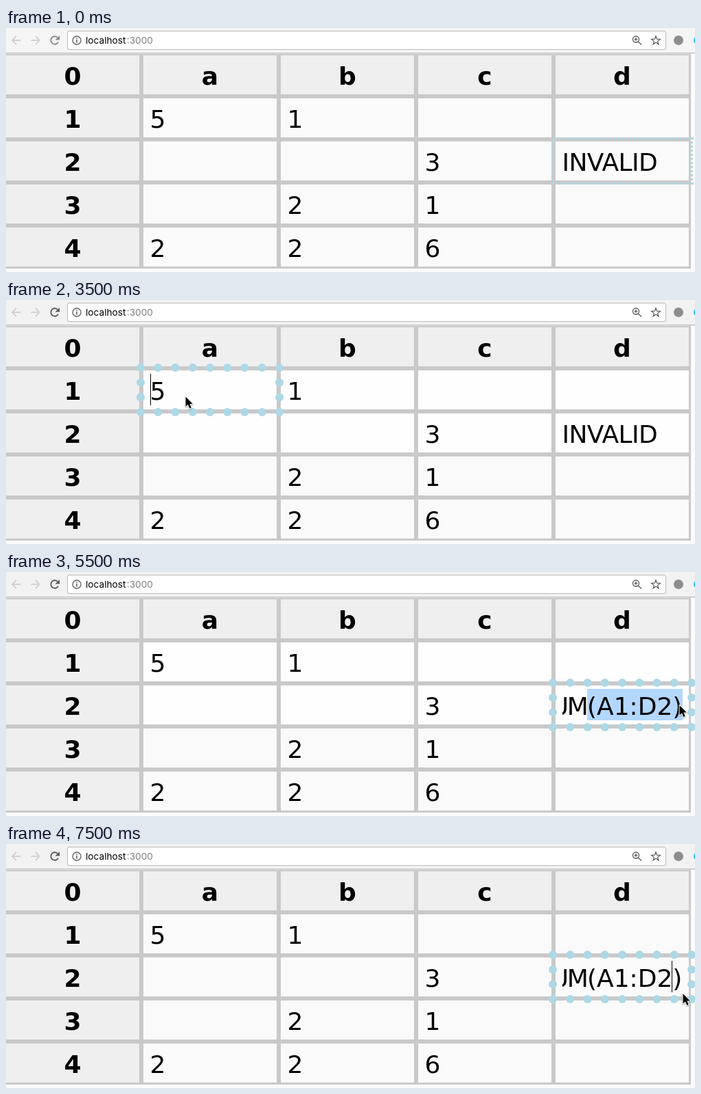
Animation of 1003 by 357 pixels, one loop 8 s. Source, as an HTML page with a canvas:

```html
<!DOCTYPE html>
<html lang="en">
<head>
<meta charset="utf-8">
<title>Spreadsheet</title>
<style>
  html, body { margin: 0; width: 100%; height: 100%; overflow: hidden; background: #fbfbfb; }
  canvas { display: block; }
</style>
</head>
<body>
<canvas id="stage" width="1003" height="357"></canvas>
<script>
const ctx = document.getElementById('stage').getContext('2d');
const LOOP = 8000, COL = 200, ROW = 63;
const BLUE = '#add8e6', SELECT = '#b3d7ff', LINE = '#c9c9c9';
const FONT = '"DejaVu Sans", sans-serif';
const rows = [
  ['0', 'a', 'b', 'c', 'd'],
  ['1', '5', '1', '', ''],
  ['2', '', '', '3', 'INVALID'],
  ['3', '', '2', '1', ''],
  ['4', '2', '2', '6', '']
];

// Pointer stops: time, x, y; a stop without a place hides it.
const pointerStops = [
  [0], [1250, 257, 68], [1500, 257, 148], [1750, 259, 146], [2000, 261.5, 141.5],
  [3750, 467, 120], [4000, 878, 191], [4250, 880.5, 213.5], [4500],
  [4750, 877.5, 198.5], [5000, 877.5, 195], [5250, 923, 195], [5500, 980.5, 195],
  [5750, 990, 195], [6000, 952, 196], [6250], [6500, 985.5, 219]
];

const between = (t, from, to) => t >= from && t < to;

function box(x, y, w, h, color) {
  ctx.fillStyle = color;
  ctx.fillRect(x, y, w, h);
}

function disc(x, y, r, color) {
  ctx.fillStyle = color;
  ctx.beginPath();
  ctx.arc(x, y, r, 0, 2 * Math.PI);
  ctx.fill();
}

function stroke(color, width, path) {
  ctx.strokeStyle = color;
  ctx.lineWidth = width;
  ctx.beginPath();
  path();
  ctx.stroke();
}

function polyline(points) {
  points.forEach(([x, y], i) => i ? ctx.lineTo(x, y) : ctx.moveTo(x, y));
}

function label(text, x, y, font, { color = '#000', align = 'left', tracking = 0 } = {}) {
  ctx.font = font;
  ctx.fillStyle = color;
  ctx.textAlign = align;
  ctx.letterSpacing = tracking + 'px';
  ctx.fillText(text, x, y);
  ctx.letterSpacing = '0px';
}

function drawArrow(x, dir) {
  stroke('#d2d2d2', 1.8, () => {
    polyline([[x - 6.5 * dir, 18], [x + 6 * dir, 18]]);
    polyline([[x, 12], [x + 6 * dir, 18], [x, 24]]);
  });
}

function drawToolbar(active) {
  const ink = active ? '#5c5c5c' : '#8c8c8c';
  box(0, 0, 1003, 36, active ? '#f2f2f2' : '#f5f5f5');
  box(0, 36, 1003, 1, '#bdbdbd');
  box(0, 37, 1003, 1, '#e4e4e4');

  drawArrow(15, -1);
  drawArrow(43, 1);
  stroke(ink, 1.9, () => ctx.arc(71, 18, 5.7, 0.5, 5.5));
  ctx.fillStyle = ink;
  ctx.beginPath();
  polyline([[78, 11], [78, 17.5], [71.5, 17.5]]);
  ctx.fill();

  ctx.fillStyle = '#fff';
  ctx.beginPath();
  ctx.roundRect(89.5, 4.5, 871, 27, 2.5);
  ctx.fill();
  ctx.strokeStyle = '#b8b8b8';
  ctx.lineWidth = 1;
  ctx.stroke();

  stroke('#5c5c5c', 1.3, () => ctx.arc(103, 18, 6, 0, 2 * Math.PI));
  box(102.2, 17, 1.6, 4.5, '#5c5c5c');
  box(102.2, 14.3, 1.6, 1.6, '#5c5c5c');
  const urlFont = '13.7px Inter, sans-serif';
  label('localhost', 116, 23, urlFont);
  label(':3000', 214, 23, urlFont, { color: '#7c7c7c', align: 'right' });

  stroke('#5c5c5c', 1.4, () => {
    ctx.arc(917, 16.5, 4.5, 0, 2 * Math.PI);
    polyline([[920.3, 19.8], [925, 24.5]]);
    polyline([[914.8, 16.5], [919.2, 16.5]]);
    polyline([[917, 14.3], [917, 18.7]]);
  });
  stroke('#5c5c5c', 1.3, () => {
    polyline(Array.from({ length: 10 }, (_, i) => {
      const a = i * Math.PI / 5 - Math.PI / 2, r = i % 2 ? 2.8 : 6.6;
      return [946 + r * Math.cos(a), 18.5 + r * Math.sin(a)];
    }));
    ctx.closePath();
  });
  disc(979, 18, 7, '#8e8e8e');
  disc(1008, 18, 7, '#35c3ee');
}

function cellColor(r, c, t) {
  if (!r || !c) return '#efefef';
  if (r === 1 && between(t, 2000, 2500)) return c === 1 ? '#fcfcfc' : '#f7f7f7';
  return r < 3 && between(t, 2500, 7500) ? '#fefefe' : '#fafafa';
}

function drawFormula(t) {
  const scroll = t >= 5500 ? 60 : 0;
  if (between(t, 5250, 5500)) box(906, 171, 14, 46, SELECT);
  if (between(t, 5500, 6500)) box(846, 171, t < 6000 ? 139 : 123, 46, SELECT);
  ctx.save();
  ctx.beginPath();
  ctx.rect(810, 168, 176, 54);
  ctx.clip();
  label('=', 809 - scroll, 207, `28px ${FONT}`);
  label('SUM', 832 - scroll, 209, `36px ${FONT}`, { tracking: -2.2 });
  label('(A1:D2)', 906 - scroll, 209, `36px ${FONT}`);
  ctx.restore();
}

function drawGrid(t) {
  box(0, 38, 997, 314, LINE);
  rows.forEach((row, r) => row.forEach((text, c) => {
    const x = c ? c * COL : 0, y = 40 + r * ROW, head = !r || !c;
    const baseline = 83 + r * ROW;
    box(x, y, c ? 194 : 194, 57, cellColor(r, c, t));
    if (r === 1 && text && between(t, 2250, 2500))
      box(c ? x + 10 : 85, 108, c ? 23 : 24, 46, SELECT);
    if (r === 2 && c === 4 && t >= 4750) drawFormula(t);
    else if (head) label(text, x + 97, baseline, `bold 36px ${FONT}`, { align: 'center' });
    else label(text, x + 9.5, baseline, `36px ${FONT}`, { tracking: text.length > 1 ? -0.6 : 0 });
  }));
}

function drawHairDots() {
  for (let x = 794; x < 1000; x += 6) {
    box(x, 160, 3, 3, BLUE);
    box(x, 226, 3, 3, BLUE);
  }
  for (let y = 160; y < 229; y += 6) {
    box(794, y, 3, 3, BLUE);
    box(997, y, 3, 3, BLUE);
  }
}

function drawFocus(x, y) {
  const w = 202, h = 65;
  for (let i = 0; i <= 8; i++)
    for (const dy of [0, h]) disc(x + i * w / 8, y + dy, 6, BLUE);
  for (let i = 1; i < 3; i++)
    for (const dx of [0, w]) disc(x + dx, y + i * h / 3, 6, BLUE);
}

function drawCaret(t) {
  if (between(t, 2500, 3000) || between(t, 3500, 4000)) box(210, 108, 1, 46, '#000');
  if (between(t, 4750, 5250)) box(810, 171, 1, 46, '#000');
  if (between(t, 6500, 7000) || t >= 7500) box(969, 171, 1, 46, '#000');
}

function drawPointer(t) {
  const [, x, y] = pointerStops.findLast(stop => t >= stop[0]);
  if (x === undefined) return;
  ctx.save();
  ctx.translate(x, y);
  ctx.beginPath();
  polyline([[0, 0], [0, 14.5], [3.4, 11.4], [5.8, 17], [8.2, 16], [5.9, 10.5], [10.3, 10.5]]);
  ctx.closePath();
  ctx.lineJoin = 'round';
  ctx.strokeStyle = '#fff';
  ctx.lineWidth = 2;
  ctx.shadowColor = 'rgba(0,0,0,.35)';
  ctx.shadowBlur = 2;
  ctx.shadowOffsetY = 1;
  ctx.stroke();
  ctx.shadowColor = 'transparent';
  ctx.fillStyle = '#000';
  ctx.fill();
  ctx.restore();
}

function render(t) {
  box(0, 0, 1003, 357, '#fbfbfb');
  drawToolbar(t >= 2000);
  drawGrid(t);
  if (t < 2500) drawHairDots();
  else if (t < 4750) drawFocus(196, 99);
  else drawFocus(796, 162);
  drawCaret(t);
  drawPointer(t);
}

const start = performance.now();
function tick() {
  render((performance.now() - start) % LOOP);
  requestAnimationFrame(tick);
}
tick();
</script>
</body>
</html>
```
